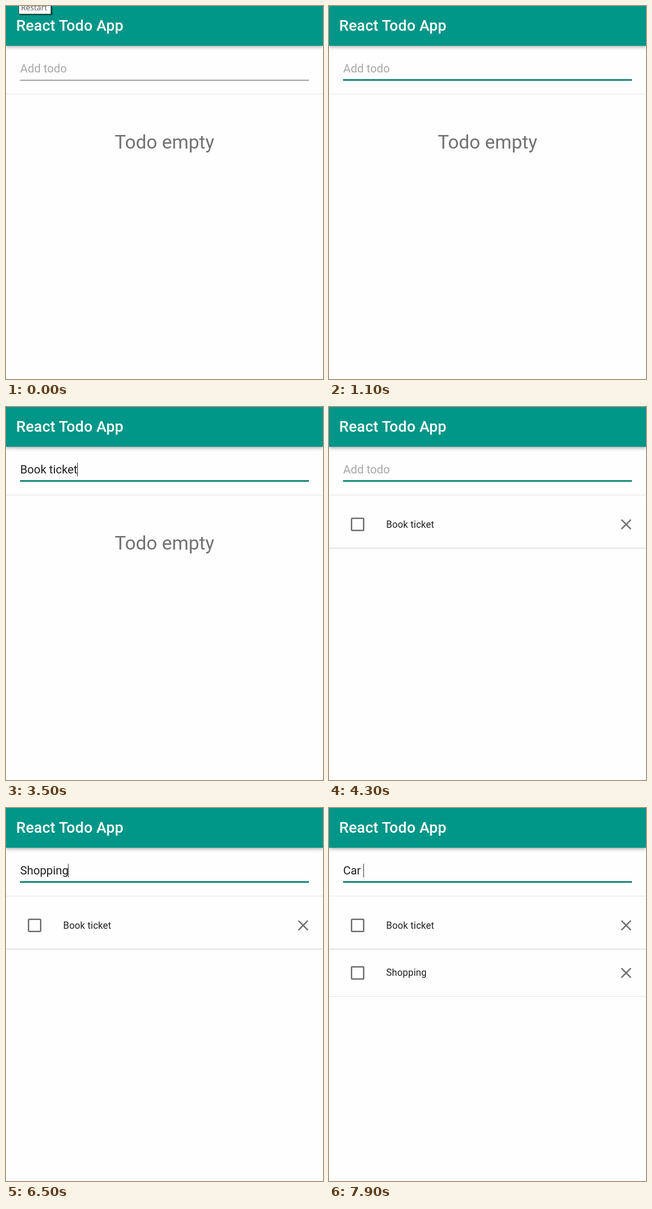
These frames come from a looping animation (654 by 769 pixels, 8000 ms). An HTML page:

```html
<!DOCTYPE html>
<html lang="en">
<head>
<meta charset="utf-8">
<title>React Todo App</title>
<style>
  html, body { margin: 0; width: 100%; height: 100%; overflow: hidden; background: #fefefe; }
  #bar {
    position: absolute; left: 0; top: 0; width: 654px; height: 82px; background: #009688;
    box-shadow: 0 2.4px 4.9px -1.2px rgba(0,0,0,.2), 0 4.9px 6.1px rgba(0,0,0,.14), 0 1.2px 12.2px rgba(0,0,0,.12);
  }
  svg { position: absolute; left: 0; top: 0; display: block; }
  text { font-family: Roboto, sans-serif; fill: #212121; white-space: pre; }
  .title { font-size: 31.2px; font-weight: 500; letter-spacing: .2px; fill: #fff; }
  .field { font-size: 23.8px; }
  .hint { fill: #a8a8a8; }
  .empty { font-size: 39px; fill: #727272; text-anchor: middle; }
  .label { font-size: 19.52px; letter-spacing: .183px; }
  .tip { font: 16.2px "Open Sans", "Noto Sans", sans-serif; fill: #575757; }
</style>
</head>
<body>
<div id="bar"></div>
<svg width="654" height="769" viewBox="0 0 654 769">
  <defs>
    <g id="controls">
      <rect x="46.5" y="229.5" width="25" height="25" rx="1.6" fill="none" stroke="#757575" stroke-width="3"/>
      <path transform="translate(613 242) scale(1.55) translate(-12 -12)" fill="#757575"
        d="M19 6.41 17.59 5 12 10.59 6.41 5 5 6.41 10.59 12 5 17.59 6.41 19 12 13.41 17.59 19 19 17.59 13.41 12z"/>
    </g>
  </defs>
  <text class="title" x="21" y="51">React Todo App</text>
  <g id="tooltip">
    <rect x="29" y="-5" width="67" height="24" fill="#000" opacity=".45"/>
    <rect x="26.5" y="-9.5" width="66" height="26" fill="#fff" stroke="#444"/>
    <text class="tip" x="31" y="9">Restart</text>
  </g>

  <text id="hint" class="field hint" x="29.2" y="137">Add todo</text>
  <text id="typed" class="field" x="29.2" y="137"></text>
  <rect id="rest" x="29" width="596"/>
  <rect id="focus" y="151" height="3" fill="#00796b"/>
  <path id="beam" d="M91 108.5h5.5l1.5 1.5 1.5-1.5h5.5M98 110v20M93 131.5h3.5l1.5-1.5 1.5 1.5h4.5" fill="none" stroke="#eee" stroke-width="1.4"/>
  <rect id="caret" y="115" height="28" fill="#111"/>

  <rect y="181" width="654" height="1" fill="#e0e0e0"/>
  <text id="empty" class="empty" x="327" y="294">Todo empty</text>
  <g id="first">
    <use href="#controls"/>
    <text class="label" x="118.1" y="249">Book ticket</text>
    <rect y="290" width="654" height="2" fill="#e0e0e0"/>
  </g>
  <g id="second">
    <use href="#controls" y="98"/>
    <text class="label" x="118.1" y="346">Shopping</text>
    <rect y="388" width="654" height="1" fill="#e0e0e0"/>
  </g>
</svg>
<script>
  const LOOP = 8000, HOVER = 400, FOCUS = 600, BLINK = 500;
  const FIRST_ADDED = 3800, SECOND_ADDED = 6900;

  // Each entry starts with an empty field; one key time per letter.
  const entries = [
    { start: FOCUS, word: "Book ticket", keys: [1500, 1700, 1800, 2000, 2200, 2800, 2900, 3100, 3200, 3300, 3500] },
    { start: FIRST_ADDED, word: "Shopping", keys: [5100, 5300, 5500, 5700, 5900, 6200, 6400, 6500] },
    { start: SECOND_ADDED, word: "Car ", keys: [7300, 7500, 7800, 7900] }
  ];

  const el = id => document.getElementById(id);
  const show = (id, on) => el(id).setAttribute("visibility", on ? "visible" : "hidden");
  const set = (id, attrs) => {
    for (const name in attrs) el(id).setAttribute(name, attrs[name]);
  };

  function drawField(t) {
    const entry = entries.filter(e => t >= e.start).pop();
    const pressed = entry ? entry.keys.filter(k => t >= k) : [];
    const count = pressed.length;
    el("typed").textContent = entry ? entry.word.slice(0, count) : "";
    show("hint", count === 0);

    const lastInput = count ? pressed[count - 1] : entry ? entry.start : 0;
    const caretOn = entry && Math.floor((t - lastInput) / BLINK) % 2 === 0;
    show("caret", caretOn);
    const x = count ? Math.round(28.3 + el("typed").getComputedTextLength()) : 29;
    set("caret", { x, width: count ? 1 : 2 });
  }

  function drawUnderline(t) {
    const hovered = t >= HOVER;
    set("rest", { y: hovered ? 151 : 152, height: hovered ? 3 : 2, fill: hovered ? "#212121" : "#949494" });
    const p = Math.min(1, Math.max(0, (t - FOCUS) / 200));
    const width = 596 * (1 - (1 - p) ** 3);
    set("focus", { x: 327 - width / 2, width });
  }

  function draw(t) {
    show("tooltip", t < 200);
    show("beam", t >= HOVER && t < 800);
    show("empty", t < FIRST_ADDED);
    show("first", t >= FIRST_ADDED);
    show("second", t >= SECOND_ADDED);
    drawField(t);
    drawUnderline(t);
  }

  const origin = performance.now();
  function tick() {
    draw((performance.now() - origin) % LOOP);
    requestAnimationFrame(tick);
  }
  draw(0);
  requestAnimationFrame(tick);
</script>
</body>
</html>
```
